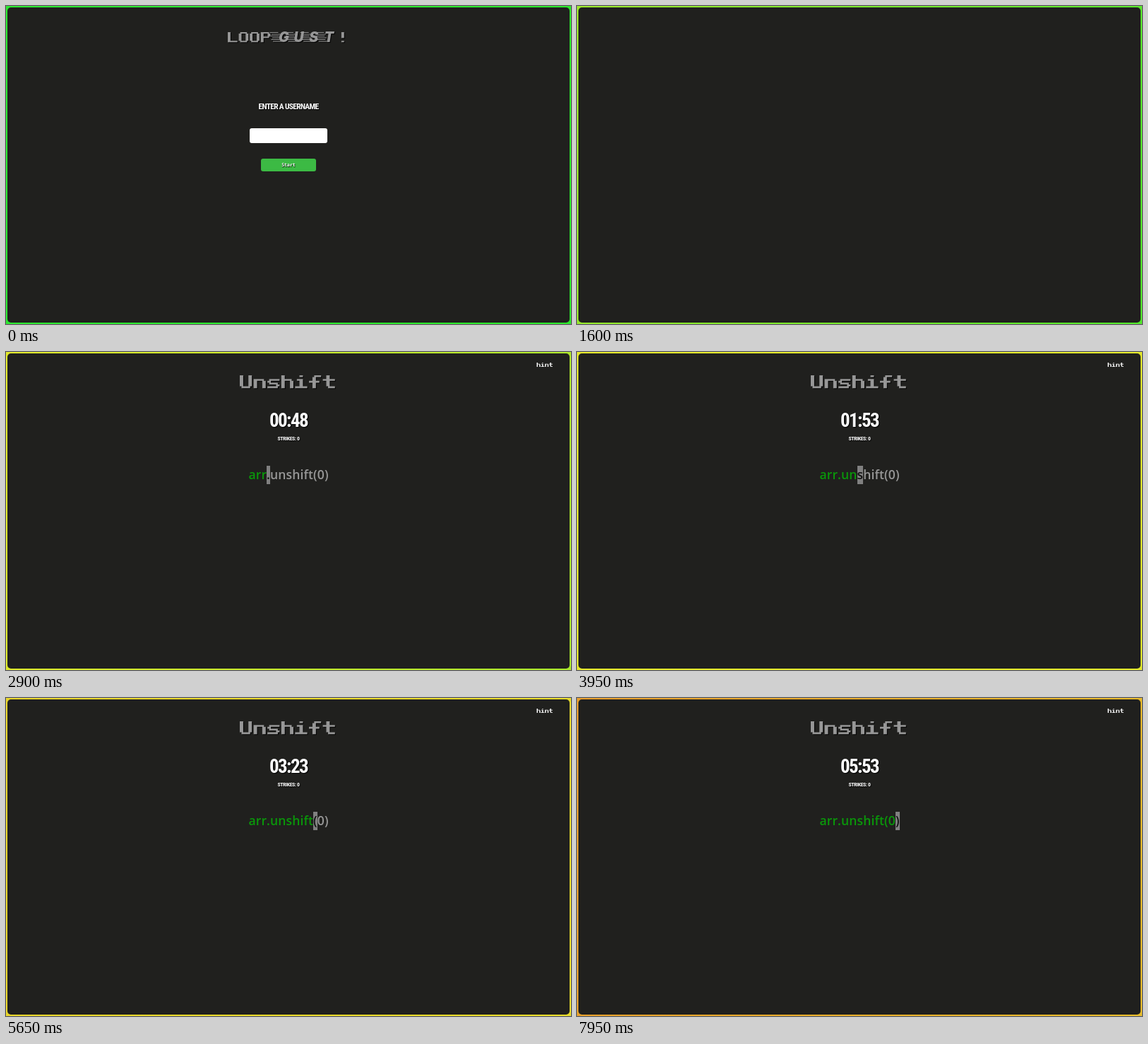
Animation, 800 px wide and 450 px high, one loop 8000 ms. Source, as an HTML page:

```html
<!DOCTYPE html>
<html lang="en">
<head>
<meta charset="utf-8">
<title>Typing game</title>
<style>
  html, body { margin: 0; width: 100%; height: 100%; overflow: hidden; }
  #stage { position: absolute; inset: 0; }
  #panel { position: absolute; inset: 2px; border-radius: 5px; background: #20201e; }
  .page, svg { position: absolute; left: 0; top: 0; width: 800px; height: 450px; }
  .page[hidden] { display: none; }
  .lettering { fill: none; stroke: #979797; stroke-linecap: square; }
  .title { filter: drop-shadow(1.5px 1.5px .5px #000); }
  .fast { font: italic 900 19.5px Inter, "Liberation Sans", sans-serif; fill: #979797; }
  .line { position: absolute; left: 0; width: 800px; text-align: center; white-space: pre; color: #fff; }
  .condensed {
    font-family: "Roboto Condensed", "Open Sans Condensed", Roboto, sans-serif;
    font-stretch: condensed; font-weight: 700; font-variant-numeric: tabular-nums;
    text-shadow: 1px 1px 1px #000;
  }
  #prompt { top: 134px; font-size: 11.5px; line-height: 16px; letter-spacing: -.7px; }
  #field, #button { position: absolute; border-radius: 3px; text-align: center; }
  #field { left: 345px; top: 173px; width: 110px; height: 21px; background: #fff; color: #111;
    font: 8px/21px "DejaVu Sans Mono", monospace; }
  #button { left: 361px; top: 216px; width: 78px; height: 18px; background: #3cba44; color: #fff;
    font: 700 6.5px/18px "DejaVu Sans Mono", monospace; text-shadow: .5px .5px 1px #000; }
  #timer { top: 82px; font-size: 27px; line-height: 30px; letter-spacing: -1.6px; }
  #strikes { top: 118px; font-size: 7.8px; line-height: 10px; letter-spacing: -.4px; }
  #code { top: 161px; font: 600 17.6px/25px "Open Sans", "Noto Sans", sans-serif;
    letter-spacing: .1px; color: #979797; }
  #code span { display: inline-block; height: 26px; }
  #code .done { color: #0a960a; }
  #code .cursor { background: #808080; color: #111; }
</style>
</head>
<body>
<div id="stage">
  <div id="panel"></div>
  <div class="page" id="start">
    <svg id="logo" role="img" aria-label="LOOPGUST !"></svg>
    <div class="line condensed" id="prompt">ENTER A USERNAME</div>
    <div id="field"></div>
    <div id="button">Start</div>
  </div>
  <div class="page" id="game">
    <svg id="heading" role="img" aria-label="Unshift"></svg>
    <div class="line condensed" id="timer"></div>
    <div class="line condensed" id="strikes">STRIKES: 0</div>
    <div class="line" id="code"></div>
  </div>
</div>
<script>
const LOOP = 8000, START_END = 1400, GAME_START = 2400, TIMER_START = 2420;
const USER = 'hint', CODE = 'arr.unshift(0)';
const NAME_KEYS = [450, 600, 750, 900];
const CODE_KEYS = [2550, 2680, 2800, 3150, 3500, 3850, 4200, 4500, 4800, 5100, 5400, 6250, 7600];
// Border hue at the left and right edge over time
const HUES = [[0, 122, 120], [1600, 84, 108], [2900, 62, 80], [3950, 61, 62],
              [5650, 54, 56], [6900, 43, 50], [8000, 36, 46]];

// Block letters as strokes: a cell is 4 units wide and 7 high
const GLYPHS = {
  U: 'M.5 .5V5.5M3 .5V5.5M1 6.5H2.5',
  n: 'M.5 6.5V2.5H2.5M3 3.5V6.5',
  s: 'M3 2.5H1M.5 3.5h0M1 4.5H2.5M3 5.5h0M2.5 6.5H.5',
  h: 'M.5 .5V6.5M.5 2.5H2.5M3 3.5V6.5',
  i: 'M1.75 .5h0M1 2.5H1.75V6.5M.5 6.5H3',
  f: 'M3 .5H2M1.5 1.5V6.5M.5 3.5H2.5',
  t: 'M1.5 .5V5.5M.5 2.5H3M2 6.5H3',
  L: 'M.5 .5V6.5H3',
  O: 'M1 .5H2.5M.5 1.5V5.5M3 1.5V5.5M1 6.5H2.5',
  P: 'M.5 6.5V.5H2.5M3 1.5V2.5M1 3.5H2.5',
  '!': 'M1.75 .5V3.5M1.75 6.5h0'
};

const $ = id => document.getElementById(id);

function blockText(text, x, y, unitX, unitY, style = '') {
  const paths = [...text].map((c, i) =>
    `<path transform="translate(${i * 4})" d="${GLYPHS[c]}"/>`).join('');
  return `<g class="lettering" style="${style}" transform="translate(${x} ${y}) scale(${unitX} ${unitY})">${paths}</g>`;
}

function fastText(text, x, baseline, step) {
  return [...text].map((c, i) => {
    const left = x + i * step;
    let streaks = '';
    for (let k = 0; k < 6; k++) streaks += `M${left - 8 - k % 2 * 2 - k * .5} ${baseline - 1 - k * 2.5}h12`;
    return `<path d="${streaks}" stroke="#979797" stroke-width="1.2"/>` +
           `<text class="fast" x="${left}" y="${baseline}">${c}</text>`;
  }).join('');
}

$('logo').innerHTML = `<g class="title">${blockText('LOOP', 314, 37, 3.9, 2.05)}` +
  `${fastText('GUST', 386, 51, 21.6)}${blockText('!', 470, 37, 3.9, 2.05)}</g>`;
$('heading').innerHTML = `<g class="title">${blockText('Unshift', 331, 33, 4.9, 2.6)}</g>` +
  blockText(USER, 751.5, 15, 1.45, .86, 'stroke:#fff');
$('code').innerHTML = [...CODE].map(c => `<span>${c}</span>`).join('');
const letters = [...$('code').children];

const countBefore = (times, t) => times.filter(time => time <= t).length;

function borderHues(t) {
  const i = HUES.findIndex(key => key[0] > t);
  const [a, b] = [HUES[i - 1], HUES[i]];
  const p = (t - a[0]) / (b[0] - a[0]);
  return [1, 2].map(side => a[side] + (b[side] - a[side]) * p);
}

function draw(t) {
  const [left, right] = borderHues(t);
  $('stage').style.background =
    `linear-gradient(100deg, hsl(${left} 80% 54%), hsl(${right} 80% 54%))`;

  $('start').hidden = t >= START_END;
  $('game').hidden = t < GAME_START;
  $('field').textContent = USER.slice(0, countBefore(NAME_KEYS, t));

  const hundredths = Math.max(0, Math.floor((t - TIMER_START) / 10));
  const pad = n => String(n).padStart(2, '0');
  $('timer').textContent = pad(Math.floor(hundredths / 100)) + ':' + pad(hundredths % 100);

  // The blink restarts on every keystroke
  const typed = countBefore(CODE_KEYS, t);
  const since = t - (CODE_KEYS[typed - 1] ?? GAME_START);
  const lit = since % 1000 < 500;
  letters.forEach((letter, i) => {
    letter.className = i < typed ? 'done' : i === typed && lit ? 'cursor' : '';
  });
}

const origin = performance.now();
function frame() {
  draw((performance.now() - origin) % LOOP);
  requestAnimationFrame(frame);
}
frame();
</script>
</body>
</html>
```
